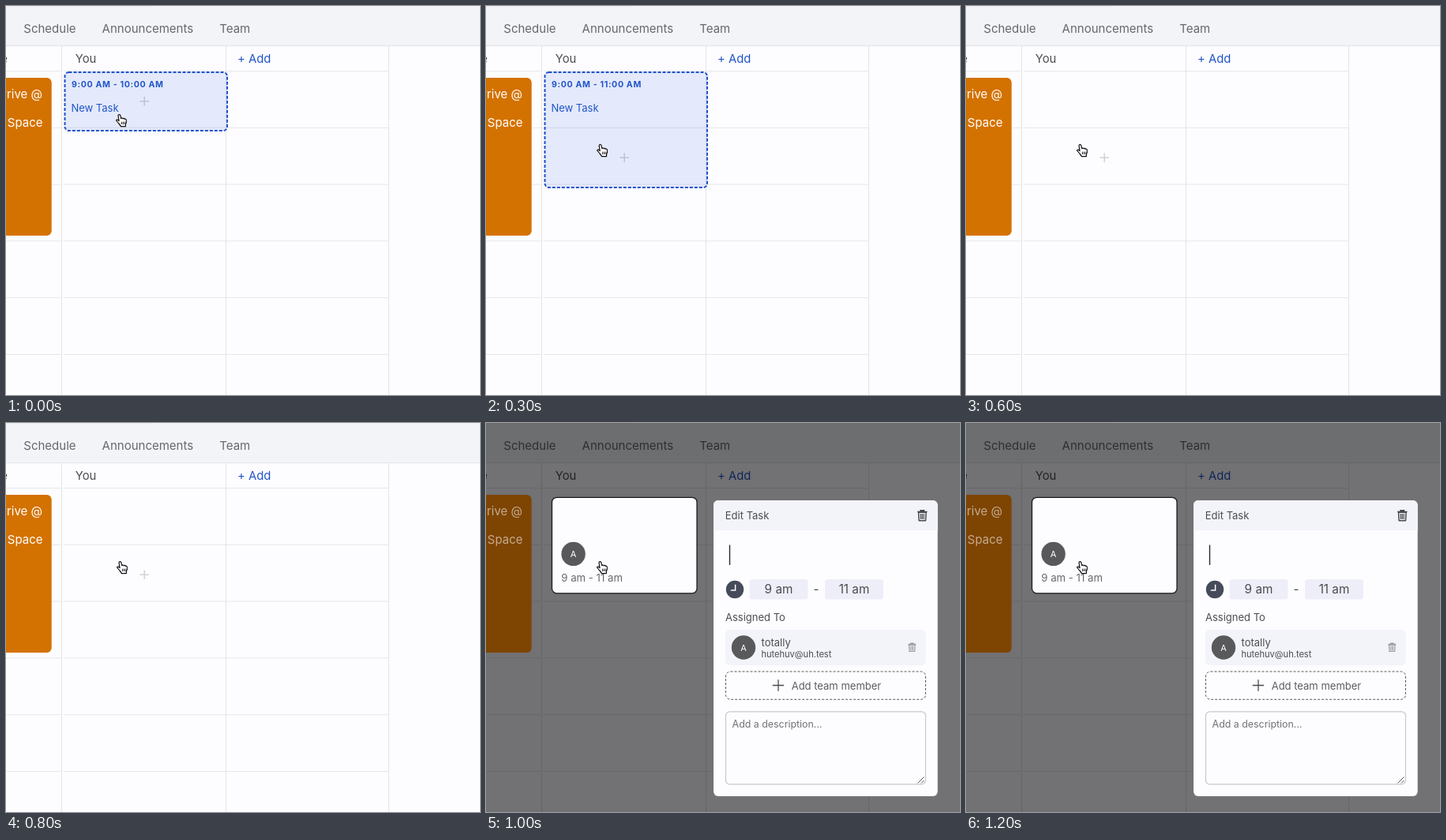
Write an HTML page that moves like this. It is 600 px wide and 493 px high and loops after 1.3 s.

```html
<!DOCTYPE html>
<html lang="en">
<head>
<meta charset="utf-8">
<title>Schedule task</title>
<style>
  html, body { margin: 0; width: 100%; height: 100%; overflow: hidden; background: #fdfcff; }
  svg { display: block; width: 100vw; height: 100vh; }
  text { font-family: Inter, Roboto, sans-serif; white-space: pre; }
</style>
</head>
<body>
<svg id="stage" viewBox="0 0 600 493"></svg>
<script>
const LOOP = 1300, STEP = 100, MODAL_AT = 1000;
const PAPER = '#fdfcff', BLUE = '#2055c8', GREY = '#68686c', DARK = '#4c4c50';
const stage = document.getElementById('stage');

function add(parent, tag, attrs, content) {
  const node = document.createElementNS('http://www.w3.org/2000/svg', tag);
  for (const key in attrs) node.setAttribute(key, attrs[key]);
  if (content) node.textContent = content;
  parent.appendChild(node);
  return node;
}
const group = (parent = stage) => add(parent, 'g', {});
const label = (parent, x, y, size, fill, content, extra) =>
  add(parent, 'text', { x, y, 'font-size': size, fill, ...extra }, content);
const box = (parent, x, y, width, height, rx, fill, extra) =>
  add(parent, 'rect', { x, y, width, height, rx, fill, ...extra });
const line = (parent, d, stroke, width = 1, extra) =>
  add(parent, 'path', { d, stroke, 'stroke-width': width, fill: 'none', ...extra });
const plus = (parent, x, y, arm, stroke, width) =>
  line(parent, `M${x - arm} ${y}h${2 * arm}M${x} ${y - arm}v${2 * arm}`, stroke, width);
const show = (node, visible) => node.setAttribute('visibility', visible ? 'visible' : 'hidden');
const MIDDLE = { 'text-anchor': 'middle' }, END = { 'text-anchor': 'end' };

function avatar(parent, x, y) {
  add(parent, 'circle', { cx: x, cy: y, r: 15.2, fill: '#59585a' });
  label(parent, x, y + 4, 11, '#fff', 'A', MIDDLE);
}

function trash(parent, x, y, scale, color) {
  const icon = add(parent, 'g', { transform: `translate(${x} ${y}) scale(${scale})` });
  line(icon, 'M-6.2 -5H6.2M-2.2 -5.4V-6.6H2.2V-5.4', color, 1.6);
  line(icon, 'M-4.8 -4.2L-4.2 6.2H4.2L4.8 -4.2Z', color, 1.5, { 'stroke-linejoin': 'round' });
  line(icon, 'M-1.9 -2.5V4.5M0 -2.5V4.5M1.9 -2.5V4.5', color, 1.2);
}

// Calendar
box(stage, 0, 0, 600, 493, 0, PAPER);
box(stage, 0, 0, 600, 50, 0, '#f3f4f8');
line(stage, 'M0 .3H184', '#e2e3e7', .6);
line(stage, 'M0 50.5H600', '#e3e3e7');
for (let row = 0; row < 6; row++) {
  const y = 82.5 + row * 71.8;
  line(stage, `M0 ${y}H70M73 ${y}H484`, '#e7e6ea');
}
line(stage, 'M70.5 51V493M278.5 51V493M484.5 51V493', '#e4e3e7');
label(stage, 22.3, 34, 15, GREY, 'Schedule');
label(stage, 121.6, 34, 15, GREY, 'Announcements');
label(stage, 270.3, 34, 15, GREY, 'Team');
label(stage, 1.8, 71.5, 14.8, DARK, 'e', END);
label(stage, 87.8, 71.5, 14.8, DARK, 'You');
label(stage, 293, 71.5, 14.8, BLUE, '+ Add');

const shade = box(stage, 0, 0, 600, 493, 0, '#000', { 'fill-opacity': .55 });

const shift = box(stage, -20, 91, 77.7, 200, 6, '#d37200');
const shiftText = group();
label(shiftText, 46, 117, 15, '#fff', 'Arrive @', END);
label(shiftText, 46.5, 153, 15, '#fff', 'Space', END);

// Task being dragged out
const draft = group();
const frame = box(draft, 74.5, 84, 205.5, 74, 5, 'rgb(37,90,220)', {
  'fill-opacity': .115, stroke: '#2053cb', 'stroke-width': 2, 'stroke-dasharray': '4 2'
});
const hours = label(draft, 83, 103.2, 10.6, BLUE, ' ', { 'font-weight': 700, 'letter-spacing': .65 });
label(draft, 82.4, 133.5, 13, BLUE, 'New Task');

const firstPlus = plus(stage, 175.2, 120.8, 5.8, 'rgba(40,40,60,.2)', 1.6);
const secondPlus = plus(stage, 175.2, 192.3, 5.8, 'rgba(40,40,60,.2)', 1.6);

// Saved task and its editor
const editor = group();
box(editor, 83.5, 94.3, 183.5, 121.5, 6, PAPER, { stroke: '#1b1b1d', 'stroke-width': 1.3 });
avatar(editor, 110.6, 165.9);
label(editor, 95.3, 201.3, 13.2, GREY, '9 am - 11 am');

box(editor, 288, 98, 283.7, 375, 6, PAPER);
line(editor, 'M288 136V104a6 6 0 0 1 6 -6H565.7a6 6 0 0 1 6 6V136Z', 'none', 0, { style: 'fill:#f3f4f9' });
label(editor, 302.8, 122.3, 13, DARK, 'Edit Task');
trash(editor, 552.3, 117.5, 1, '#48484d');
line(editor, 'M308.5 154.5V180', '#2a2a2d', 1.4);

add(editor, 'circle', { cx: 315, cy: 211, r: 11.2, fill: '#454b5b' });
line(editor, 'M315.6 204.8V212H309.8', '#fff', 1.5);
box(editor, 333.5, 198, 74, 25.5, 4, '#eeeef8');
box(editor, 429, 198, 74, 25.5, 4, '#eeeef8');
label(editor, 370.5, 216.3, 15.3, DARK, '9 am', MIDDLE);
label(editor, 418, 216.3, 15.3, DARK, '-', MIDDLE);
label(editor, 466, 216.3, 15.3, DARK, '11 am', MIDDLE);

label(editor, 303, 251.2, 13, DARK, 'Assigned To');
box(editor, 303, 262, 253.7, 45, 5, '#f3f4fa');
avatar(editor, 326, 284.5);
label(editor, 348.5, 283, 13, DARK, 'totally');
label(editor, 348.4, 297, 11.1, DARK, 'hutehuv@uh.test');
trash(editor, 539.3, 284.5, .8, '#9c9ca2');

box(editor, 303.5, 315, 253, 35.3, 6, 'none', { stroke: '#59595d', 'stroke-dasharray': '3 2' });
plus(editor, 370, 332.5, 7.2, DARK, 1.3);
label(editor, 386.7, 337.5, 13, '#5c5c60', 'Add team member');

box(editor, 303.5, 365.8, 253, 92, 5, 'none', { stroke: '#c9c9cd', 'stroke-width': 1.2 });
label(editor, 311.6, 386, 12.4, '#727276', 'Add a description...');
line(editor, 'M546.5 456.5L554.5 448.5M551 456.5L554.5 453', '#55555a', 1);

// Pointer
const hand = group();
add(hand, 'path', {
  d: 'M3 2.2C3 .6 5.4 .4 5.8 2L6.6 6C7 5 8.6 5 9 6.2C9.6 5.2 11 5.6 11.2 6.8' +
     'C11.8 6 13.2 6.6 13.3 7.8C13.6 10 13.4 11.6 12.4 13L12.3 16H6.2' +
     'C5.8 14 4.2 12.8 2.6 10.8C1.5 9.4 .3 8.8 .6 7.8C1.2 6.8 2.6 7.4 4 9Z',
  fill: '#fff', stroke: '#111', 'stroke-width': 1.2, 'stroke-linejoin': 'round'
});
line(hand, 'M7.4 10V13.3M9.3 10V13.3M11.1 10V13.3', '#111', .9);

// One entry per step; the last one holds.
const handX = [146, 146, 146.5, 147.2, 147.5, 147.5, 147];
const handY = [145, 171, 180, 183, 184, 184, 183];
const firstFade = [1, 1, .4, 0];
const secondFade = [0, .3, .8, 1];
const at = (values, step) => values[Math.min(step, values.length - 1)];

function render(time) {
  const t = time % LOOP, step = Math.floor(t / STEP);
  const editing = t >= MODAL_AT, stretched = step >= 1;
  show(draft, step < 6);
  show(shade, editing);
  show(editor, editing);
  frame.setAttribute('height', stretched ? 146 : 74);
  hours.textContent = `9:00 AM - ${stretched ? 11 : 10}:00 AM`;
  firstPlus.setAttribute('opacity', at(firstFade, step));
  secondPlus.setAttribute('opacity', editing ? 0 : at(secondFade, step));
  shift.setAttribute('fill', editing ? '#7e4402' : '#d37200');
  shiftText.setAttribute('opacity', editing ? .55 : 1);
  hand.setAttribute('transform', `translate(${at(handX, step) - 7} ${at(handY, step) - 8.3})`);
}

let start;
function tick(now) {
  start ??= now;
  render(now - start);
  requestAnimationFrame(tick);
}
render(0);
requestAnimationFrame(tick);
</script>
</body>
</html>
```
